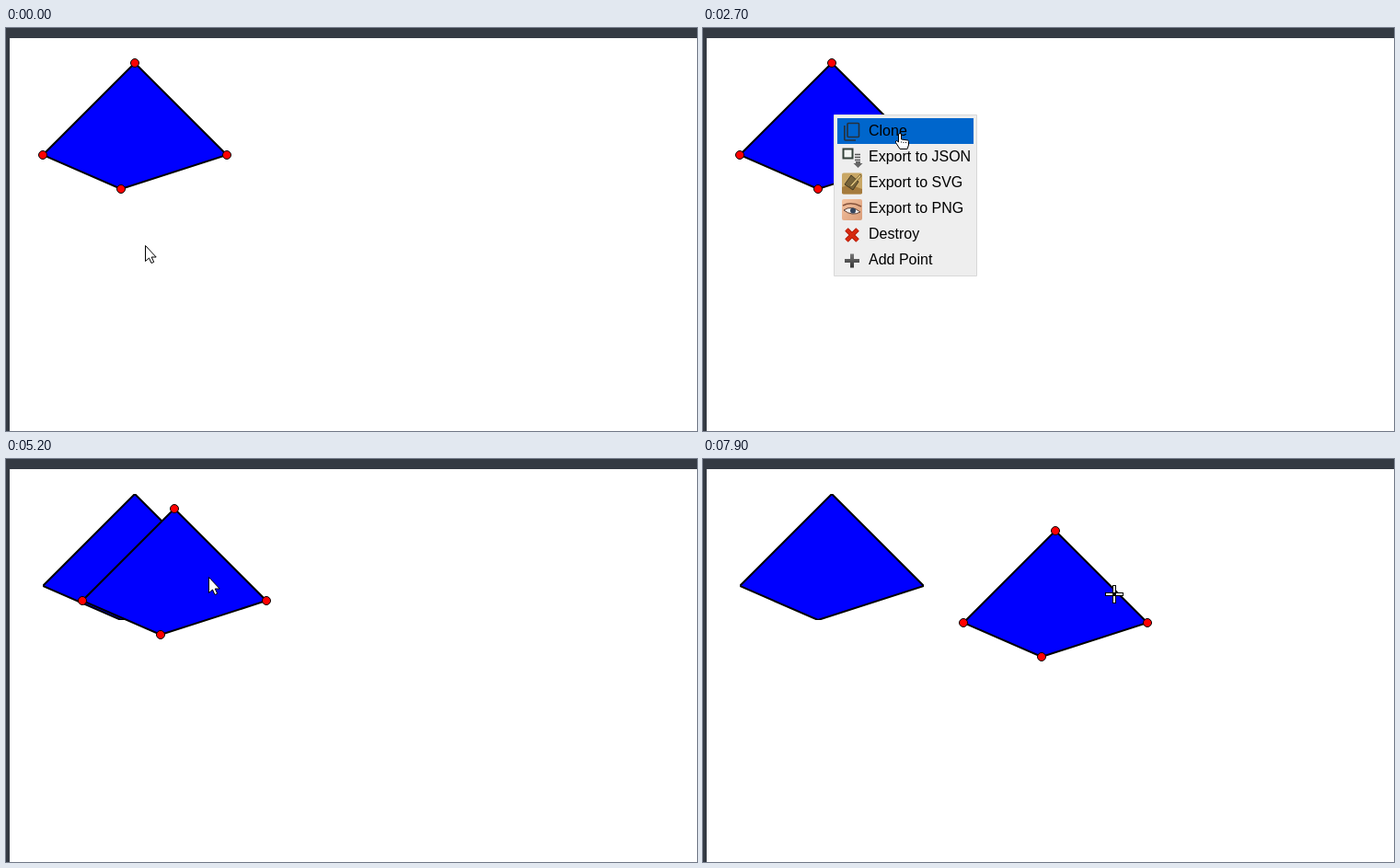
Recreate the animation shown at these times as an HTML page. Size 751 px wide and 438 px high, loop 8 s.

```html
<!DOCTYPE html>
<html lang="en">
<head>
<meta charset="utf-8">
<title>Polygon editor: clone and drag</title>
<style>
  html, body { margin: 0; width: 100%; height: 100%; overflow: hidden; background: #fff; }
  svg { display: block; width: 751px; height: 438px; }
  text { font: 16px "Liberation Sans", Arial, sans-serif; }
</style>
</head>
<body>
<svg viewBox="0 0 751 438">
  <defs>
    <clipPath id="bounds"><path d="M40 38h200v137H40z"/></clipPath>
    <path id="shape" d="M140 38L240 138 125 175 40 138z" fill="#00f" stroke="#000" stroke-width="2" clip-path="url(#bounds)"/>
    <g id="dots" fill="#f00" stroke="#000">
      <circle cx="140" cy="38" r="4.5"/>
      <circle cx="240" cy="138" r="4.5"/>
      <circle cx="125" cy="175" r="4.5"/>
      <circle cx="40" cy="138" r="4.5"/>
    </g>
    <linearGradient id="skin" x2="1" y2="1">
      <stop stop-color="#f5c3a0"/><stop offset="1" stop-color="#d99c78"/>
    </linearGradient>
    <linearGradient id="grey" x2="0" y2="1">
      <stop stop-color="#777"/><stop offset="1" stop-color="#333"/>
    </linearGradient>
  </defs>

  <path d="M0 0h751v11H4v427H0z" fill="#343a43"/>

  <use href="#shape"/>
  <g id="clone">
    <use href="#shape"/>
  </g>
  <use id="handles" href="#dots"/>

  <g id="menu">
    <path d="M142.500 94.500h155v175h-155z" fill="#eee" stroke="#d8d8d8"/>
    <path id="highlight" d="M146 98h148v28H146z" fill="#06c"/>
    <g id="labels"></g>
    <!-- clone -->
    <g fill="none" stroke="#26303a" stroke-width="1.600">
      <path d="M158 103.500h10.500q1 0 1 1v13q0 1-1 1H158q-1 0-1-1v-13q0-1 1-1z"/>
      <path d="M153.800 106v15q0 1 1 1H166"/>
    </g>
    <!-- export to JSON -->
    <path d="M152.500 131.500h10v10h-10z" fill="#f4f7f4" stroke="#34423a" stroke-width="2"/>
    <path d="M165 137.500h6M165 140.500h6M165 143.500h6" stroke="#555" stroke-width="1.500"/>
    <path d="M166 145h5v2h2.500l-5 5-5-5h2.500z" fill="#666"/>
    <!-- export to SVG -->
    <rect x="151" y="157.500" width="22" height="23" rx="2" fill="#c9a765"/>
    <path d="M151 173l8-3 14 5v4q0 1.500-2 1.500h-18q-2 0-2-1.500z" fill="#a57b3d"/>
    <path d="M161 160l8 7-6 9-9-6z" fill="#77643a" stroke="#453a22"/>
    <path d="M171 159l-10 11-2 3 3-1 10-11z" fill="#e6cb83" stroke="#594520" stroke-width=".7"/>
    <!-- export to PNG -->
    <rect x="151" y="186" width="22" height="23" rx="2" fill="url(#skin)"/>
    <path d="M152 193q9-5 20 1" fill="none" stroke="#87543c" stroke-width="1.500"/>
    <path d="M153 198q8-6 18 2-9 5-18-2z" fill="#f4f1ef" stroke="#5f4034"/>
    <circle cx="163" cy="198.500" r="3" fill="#34445c"/>
    <!-- destroy -->
    <path d="M156 219l12 12M168 219l-12 12" stroke="#a81604" stroke-width="5"/>
    <path d="M156 219l12 12M168 219l-12 12" stroke="#d62a10" stroke-width="3.500"/>
    <!-- add point -->
    <path d="M160 245.500h4v5.500h6v4h-6v5.500h-4V255h-6v-4h6z" fill="url(#grey)"/>
  </g>

  <g id="cursor">
    <path id="arrow" d="M.5.5v17l4-3.500 2.500 5.500 2.700-1.200-2.500-5.300h5z" fill="#fff" stroke="#000"/>
    <g id="cross">
      <path d="M-10-2h8v-8h4v8h8v4h-8v8h-4v-8h-8z"/>
      <path d="M-9-1h7v2h-7zM2-1h7v2H2zM-1-9h2v7h-2zM-1 2h2v7h-2z" fill="#fff"/>
    </g>
    <g id="hand" stroke="#000">
      <path d="M.5 2q0-1.500 1.500-1.500T3.500 2v5l7 1q1 .3 1 1.500v3.500l-1.500 4.500h-8l-4.500-7q-.5-2 1-2l2 1.500z" fill="#fff" stroke-linejoin="round"/>
      <path d="M3.500 9.500v1M6 10v1M8.500 10v1" fill="none"/>
    </g>
  </g>
</svg>
<script>
const $ = id => document.getElementById(id);
const LOOP = 8000, STEP = 100;

// [first step, last step, x, y, look]
const pointer = [
  [0, 0, 151, 236, 'arrow'],
  [300, 300, 150, 231, 'arrow'],
  [500, 800, 148, 174, 'arrow'],
  [900, 1300, 142, 94, 'cross'],
  [1900, 1900, 142, 93, 'arrow'],
  [2700, 2700, 212, 114, 'hand'],
  [3500, 3500, 212, 116, 'arrow'],
  [4100, 4200, 206, 114, 'cross'],
  [4400, 4500, 161, 113, 'cross'],
  [4600, 4600, 180, 116, 'cross'],
  [5100, 5200, 220, 128, 'arrow'],
  [5400, 5500, 353, 148, 'arrow'],
  [5800, 5900, 399, 147, 'arrow'],
  [6300, 6300, 405, 164, 'arrow'],
  [6500, 6500, 414, 199, 'arrow'],
  [7100, 7200, 420, 186, 'cross'],
  [7700, 7900, 447, 147, 'cross']
];
const drag = [
  [0, 0, 5, 5],
  [5100, 5200, 43, 16],
  [5400, 5500, 183, 37],
  [5800, 5900, 243, 40]
];

const items = ['Clone', 'Export to JSON', 'Export to SVG', 'Export to PNG', 'Destroy', 'Add Point'];
$('labels').innerHTML = items.map((s, i) => `<text x="180" y="${117 + 28 * i}">${s}</text>`).join('');

function at(track, t) {
  const i = track.findLastIndex(k => k[0] <= t);
  const [start, end, x, y, look] = track[i];
  const [, , px, py] = track[Math.max(0, i - 1)];
  const f = Math.min(1, (t - start + STEP) / (end - start + STEP));
  return { x: Math.round(px + (x - px) * f), y: Math.round(py + (y - py) * f), look };
}

const show = (id, on) => $(id).setAttribute('visibility', on ? 'visible' : 'hidden');
const move = (id, x, y) => $(id).setAttribute('transform', `translate(${x} ${y})`);

function draw(now) {
  const t = Math.floor(now % LOOP / STEP) * STEP;
  const p = at(pointer, t), d = at(drag, t), picked = t >= 5100;
  const menuOpen = t >= 1900 && t < 3400;
  show('menu', menuOpen);
  show('highlight', menuOpen && t >= 2700);
  show('clone', t >= 3400);
  move('clone', d.x, d.y);
  move('handles', picked ? d.x : 0, picked ? d.y : 0);
  move('cursor', p.x, p.y);
  for (const look of ['arrow', 'cross', 'hand']) show(look, look === p.look);
  requestAnimationFrame(draw);
}
requestAnimationFrame(draw);
</script>
</body>
</html>
```
